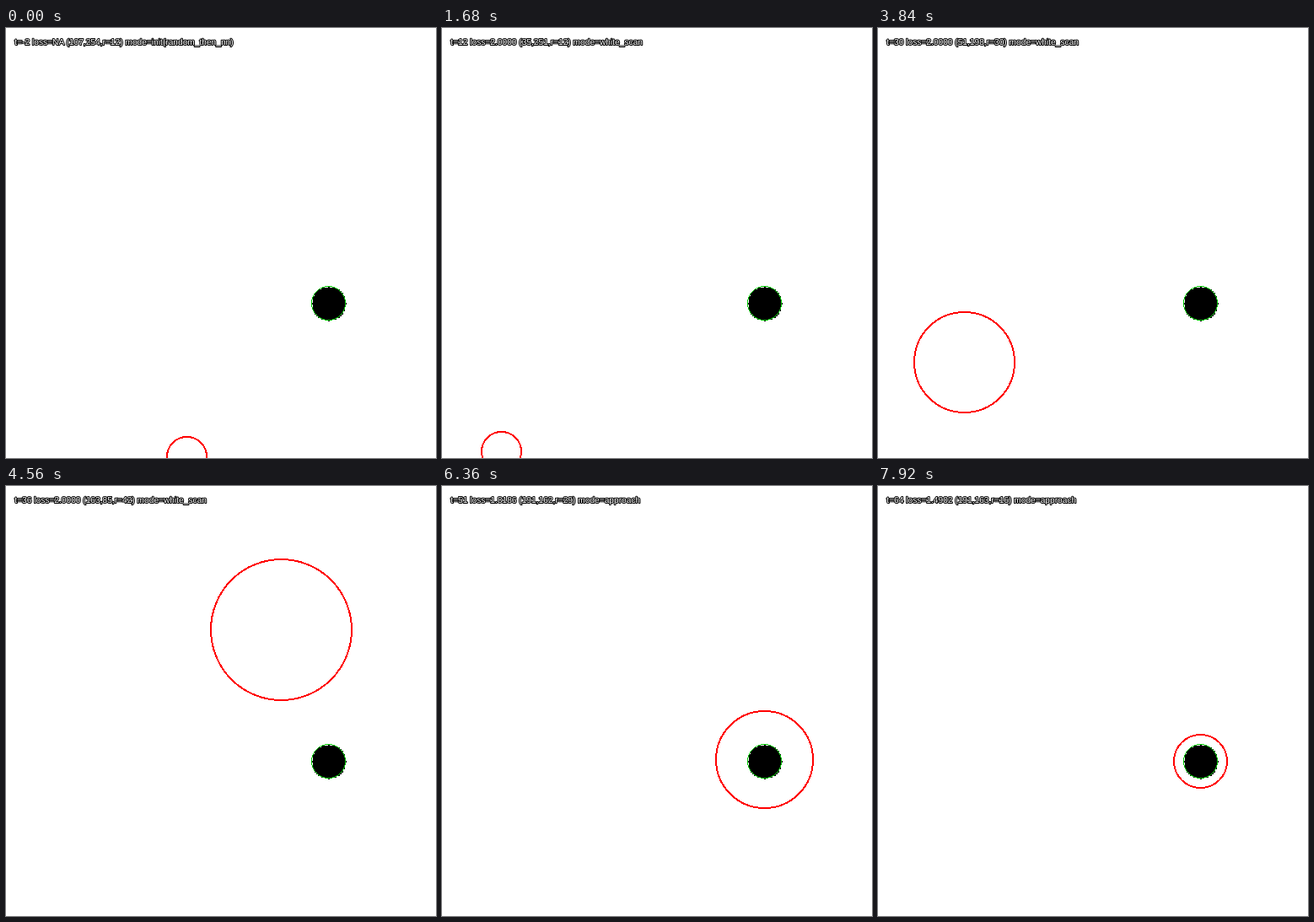
These frames come from a looping animation (510 by 510 pixels, 8000 ms). An HTML page:

```html
<!DOCTYPE html>
<html lang="en">
<head>
<meta charset="utf-8">
<title>Circle search</title>
<style>
  html, body { margin: 0; width: 100%; height: 100%; overflow: hidden; background: #fff; }
  svg { display: block; width: 100%; height: 100%; }
  circle, path { shape-rendering: crispEdges; }
  circle { fill: none; }
  text {
    font: 10.2px "Liberation Sans", Arial, sans-serif;
    text-rendering: geometricPrecision;
    fill: #fff; stroke: #000; stroke-width: 2px; stroke-linejoin: round;
    paint-order: stroke; white-space: pre;
  }
</style>
</head>
<body>
<svg viewBox="0 0 510 510">
  <path id="disc" fill="#000"/>
  <circle cx="382.5" cy="326.5" r="20" stroke="#00c800" stroke-width="1"/>
  <circle id="probe" stroke="#f00" stroke-width="2"/>
  <text id="label" x="10.3" y="19.5"></text>
</svg>
<script>
const STEP_MS = 120, LOOP_MS = 8000, FIRST = -2;
const SPRING = 36, APPROACH = 38;       // steps where homing and shrinking begin
const GROW_START = 19, GROW_EVERY = 4;
const GOAL = { x: 191, y: 163, r: 10 };
const byId = id => document.getElementById(id);
const disc = byId('disc'), probe = byId('probe'), label = byId('label');

// Corners of the scan on the half-size grid
const SCAN = [
  { t: -2, x: 107, y: 254 }, { t: 5, x: 192, y: 250 }, { t: 12, x: 35, y: 251 },
  { t: 19, x: 10, y: 240 }, { t: 23, x: 28, y: 110 }, { t: 28, x: 14, y: 235 },
  { t: SPRING, x: 163, y: 85 }
];

// Damped swing from one value to another
const swing = (from, to, s, speed) => to + (from - to) * Math.exp(-0.3 * s) * Math.cos(speed * s);

function position(step) {
  if (step > SPRING) {
    const { x, y } = SCAN[SCAN.length - 1], s = step - SPRING;
    return [swing(x, GOAL.x, s, 0.45), swing(y, GOAL.y, s, 0.39)].map(Math.round);
  }
  const i = Math.max(1, SCAN.findIndex(p => p.t >= step));
  const a = SCAN[i - 1], b = SCAN[i];
  const k = (step - a.t) / (b.t - a.t);
  return [a.x + (b.x - a.x) * k, a.y + (b.y - a.y) * k].map(Math.round);
}

function radius(step) {
  if (step >= APPROACH) return 42 - (step - APPROACH);
  return 12 + 6 * Math.max(0, Math.floor((step - GROW_START) / GROW_EVERY) + 1);
}

function lossText(step, r) {
  if (step < 0) return 'NA';
  if (step < APPROACH) return '2.0000';
  const inverse = 1.9616 + (r - 16) * (0.23949 + 0.006757 * (r - 24));
  return (2 - 1 / inverse).toFixed(4);
}

function modeText(step) {
  if (step < 0) return 'init(random_then_nn)';
  if (step >= APPROACH) return 'approach';
  const grows = step >= GROW_START && (step - GROW_START) % GROW_EVERY === 0;
  return grows ? 'white_grow' : 'white_scan';
}

// Disc made of double-size pixel rows
function pixelDisc({ x, y, r }) {
  let d = '';
  for (let dy = -r; dy <= r; dy++) {
    const half = Math.floor(Math.sqrt(r * r - dy * dy));
    d += `M${2 * (x - half)} ${2 * (y + dy)}h${4 * half + 2}v2h${-4 * half - 2}z`;
  }
  return d;
}

function draw(ms) {
  const step = FIRST + Math.floor((ms % LOOP_MS) / STEP_MS);
  const [x, y] = position(step), r = radius(step);
  probe.setAttribute('cx', 2 * x + 0.5);
  probe.setAttribute('cy', 2 * y + 0.5);
  probe.setAttribute('r', 2 * r - 0.5);
  label.textContent = `t=${step} loss=${lossText(step, r)} (${x},${y},r=${r}) mode=${modeText(step)}`;
}

disc.setAttribute('d', pixelDisc(GOAL));
const start = performance.now();
function tick() {
  draw(performance.now() - start);
  requestAnimationFrame(tick);
}
tick();
</script>
</body>
</html>
```
